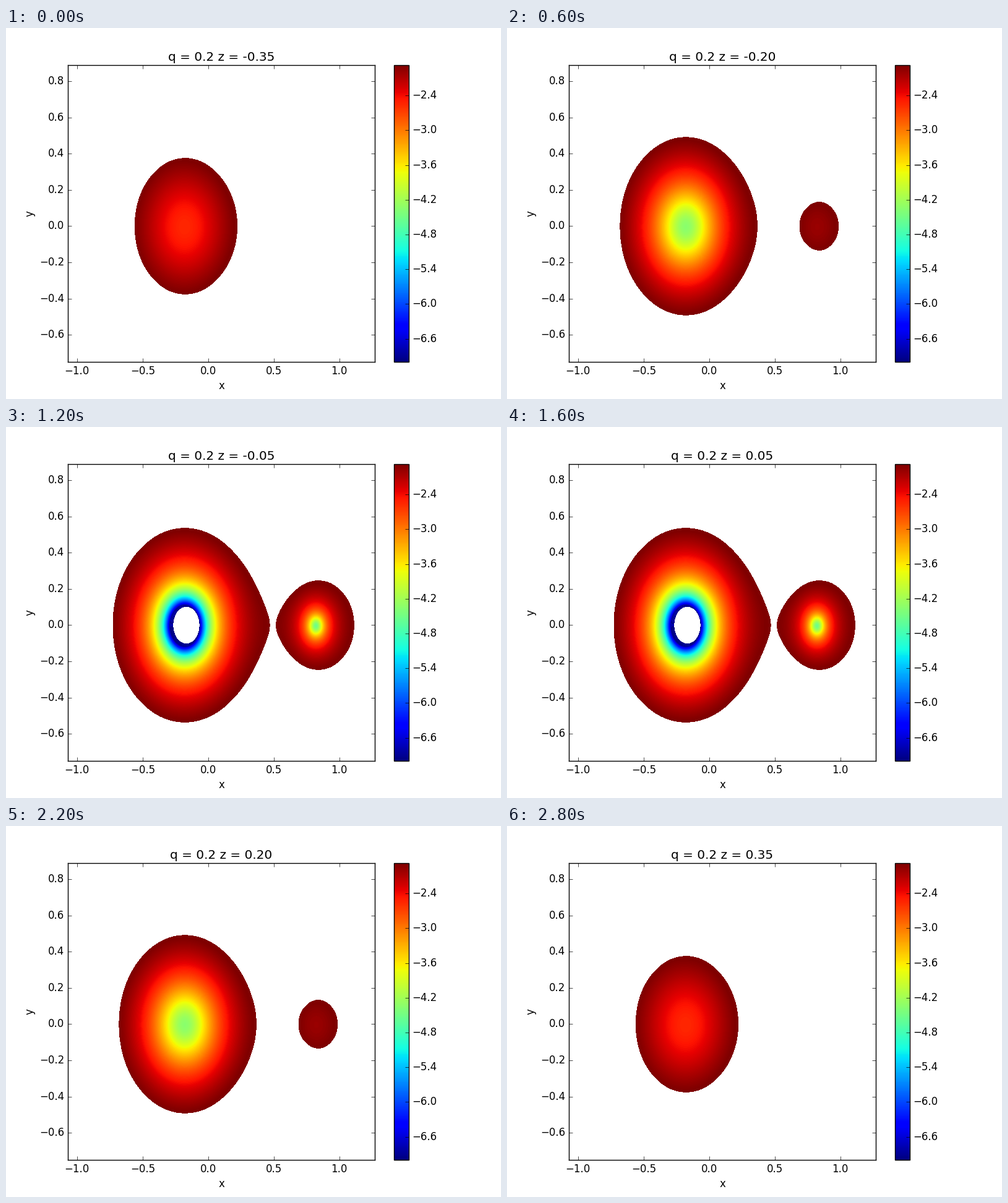
Animation, 800 px wide and 600 px high, one loop 3000 ms. Source, as a matplotlib script:

```python
import itertools

import matplotlib.pyplot as plt
import numpy as np
from matplotlib.animation import FuncAnimation

plt.style.use("classic")
plt.rcParams.update({
    "font.family": "DejaVu Sans",
    "figure.facecolor": "white",
    "savefig.facecolor": "white",
})

Q = 0.2
FRAMES = 15
Z_MAX, Z_STEP = 0.35, 0.05
X_LIM, Y_LIM = (-1.07, 1.27), (-0.75, 0.89)
COLS, ROWS = 496, 480
FLOOR = -7.0
DOT_RADIUS = 3.105  # in pixels


def potential(x, y, z):
    """Roche potential of a binary with mass ratio Q and unit separation."""
    m1, m2 = 1 / (1 + Q), Q / (1 + Q)
    r1 = np.sqrt((x + m2) ** 2 + y ** 2 + z ** 2)
    r2 = np.sqrt((x - m1) ** 2 + y ** 2 + z ** 2)
    return -m1 / r1 - m2 / r2 - (x ** 2 + y ** 2) / 2


# The saddle between the two masses bounds both lobes.
CEILING = potential(np.linspace(0.3, 0.7, 4001), 0, 0).max()

# Sample points sit on pixel edges in x and on pixel centres in y.
xs = X_LIM[0] + np.arange(COLS) * (X_LIM[1] - X_LIM[0]) / COLS
ys = Y_LIM[0] + (np.arange(ROWS) + 0.5) * (Y_LIM[1] - Y_LIM[0]) / ROWS
GRID_X, GRID_Y = np.meshgrid(xs, ys)

DISC = [(i, j) for i, j in itertools.product(range(-3, 5), range(-4, 5))
        if (i - 0.5) ** 2 + j ** 2 <= DOT_RADIUS ** 2]


def height(i):
    return round(-Z_MAX + i * Z_STEP, 2) + 0.0


def lobes(z):
    """Paint each sample as a round dot, later columns over earlier ones."""
    phi = potential(GRID_X, GRID_Y, z)
    phi[(phi < FLOOR) | (phi > CEILING)] = np.nan
    out = np.full_like(phi, np.nan)
    for i, j in DISC:
        dots = np.roll(phi, (-j, -i), axis=(0, 1))
        out = np.where(np.isnan(dots), out, dots)
    return np.ma.masked_invalid(out)


fig = plt.figure(figsize=(8, 6), dpi=100, facecolor="white")
ax = fig.add_axes([0.125, 0.1, 0.62, 0.8])
image = ax.imshow(lobes(height(0)), cmap="jet", vmin=FLOOR, vmax=CEILING,
                  origin="lower", extent=X_LIM + Y_LIM, aspect="auto",
                  interpolation="nearest")
ax.set_xticks(np.round(np.arange(-1, 1.1, 0.5), 1))
ax.set_yticks(np.round(np.arange(-0.6, 0.9, 0.2), 1) + 0.0)
ax.set_xlim(X_LIM)
ax.set_ylim(Y_LIM)
ax.set_xlabel("x")
ax.set_ylabel("y")
title = ax.set_title("")

bar_ax = fig.add_axes([627 / 800, 0.1, 24 / 800, 0.8])
fig.colorbar(image, cax=bar_ax,
             ticks=np.round(np.arange(-6.6, -2.3, 0.6), 1))


def update(i):
    z = height(i)
    image.set_data(lobes(z))
    title.set_text(f"q = {Q} z = {z:.2f}")
    return image, title


anim = FuncAnimation(fig, update, frames=FRAMES, interval=200,
                     repeat=True, repeat_delay=0, blit=False)
plt.show()
```
